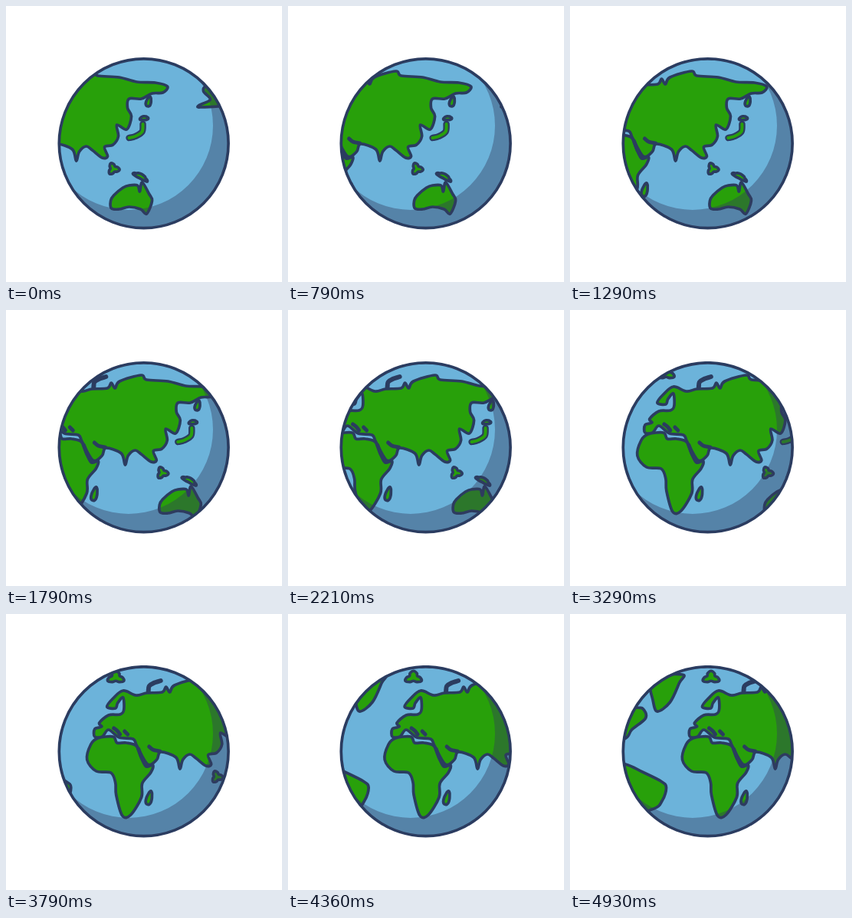
These frames come from a looping animation (360 px wide and 360 px high, 5 s). An HTML page:

```html
<!DOCTYPE html>
<html lang="en">
<head>
<meta charset="utf-8">
<title>Turning globe</title>
<style>
  html, body { margin: 0; height: 100%; overflow: hidden; background: #fff; }
  svg { display: block; width: 100%; height: 100%; }
  .ink { stroke: #2b3c60; stroke-width: 3.7; stroke-linejoin: round; stroke-linecap: round; }
  #map { fill: #28a00a; }
</style>
</head>
<body>
<svg viewBox="0 0 360 360">
  <clipPath id="disc"><circle cx="179.7" cy="179.2" r="110.5"/></clipPath>
  <g clip-path="url(#disc)">
    <rect width="360" height="360" fill="#6cb3da"/>
    <g id="map" class="ink"></g>
    <path fill="#323b5d" fill-opacity=".4" fill-rule="evenodd"
      d="M0 0H360V360H0Z M50 156a110 110 0 0 0 220 0a110 110 0 0 0-220 0Z"/>
  </g>
  <circle class="ink" cx="179.7" cy="179.2" r="110.4" fill="none"/>
</svg>
<script>
const FPS = 14, FRAMES = 70, STEP = 2.55, HOME = 39;
const map = document.getElementById('map');

// Smooth curve through all points.
function curve(pts, closed) {
  const n = pts.length;
  const at = i => pts[closed ? (i + n) % n : Math.max(0, Math.min(n - 1, i))];
  let d = 'M' + pts[0];
  for (let i = 0; i < (closed ? n : n - 1); i++) {
    const [a, b, c, e] = [at(i - 1), at(i), at(i + 1), at(i + 2)];
    const c1 = b.map((v, k) => v + (c[k] - a[k]) / 6);
    const c2 = c.map((v, k) => v - (e[k] - b[k]) / 6);
    d += `C${c1} ${c2} ${c}`;
  }
  return d + (closed ? 'Z' : '');
}

function add(pts, closed, style = '') {
  const path = document.createElementNS('http://www.w3.org/2000/svg', 'path');
  path.setAttribute('d', curve(pts, closed));
  path.setAttribute('style', style);
  map.append(path);
}

const points = text => text.split(',').map(p => p.trim().split(' ').map(Number));
const land = text => add(points(text), true);
const line = (text, width, color = '#2b3c60') =>
  add(points(text), false, `fill:none;stroke:${color};stroke-width:${width}`);

// Tilted ellipse with a three-lobed wobble.
function island(x, y, rx, ry, tilt = 0, wobble = 0.1) {
  const cos = Math.cos(tilt), sin = Math.sin(tilt);
  add(Array.from({ length: 12 }, (_, i) => {
    const a = i * Math.PI / 6, r = 1 + wobble * Math.sin(3 * a);
    const u = rx * r * Math.cos(a), v = ry * r * Math.sin(a);
    return [x + u * cos - v * sin, y + u * sin + v * cos];
  }), true);
}

// Eurasia, clockwise from Scandinavia
land(`96 121, 104 110, 117 100, 134 106, 148 103, 168 102, 173 95, 178 102, 184 93, 212 85,
  219 91, 247 93, 270 99, 294 100, 310 105, 304 113, 290 114, 276 121, 260 121, 258 133,
  263 144, 257 161, 244 155, 246 170, 239 181, 228 184, 232 196, 225 198, 212 188, 204 183,
  195 190, 191 202, 186 187, 166 180, 161 190, 149 196, 135 172, 130 163, 112 161, 98 151,
  90 160, 80 160, 80 150, 89 147, 86 142, 98 132, 113 131, 118 125, 117 109, 110 116, 107 123`);
// Africa
land(`134 172, 141 188, 147 199, 156 197, 153 207, 142 221, 141 239, 127 262, 116 263, 108 236,
  107 220, 101 207, 82 205, 70 190, 75 170, 84 162, 104 160, 109 168, 121 168`);
// Australia
land(`240 247, 252 237, 260 234, 271 234, 274 242, 277 230, 286 245, 290 254, 283 271, 275 265,
  260 262, 247 265, 237 264, 236 254`);
// Alaska
land('390 90, 362 103, 357 111, 366 122, 352 129, 353 132, 390 126');
// Greenland, North and South America
land('28 98, 26 82, 70 79, 66 90, 54 115, 37 127, 31 110');
land('-30 118, 10 122, 19 124, 22 136, 4 151, -4 162, -30 168');
land('-30 194, -4 196, 18 206, 42 218, 49 226, 44 243, 30 255, -30 270');

island(151, 240.5, 3.6, 9, 0.25);         // Madagascar
island(285.5, 125, 3.2, 6.5, 0.25);       // Kamchatka
island(279.5, 146.5, 5.5, 2.5, -0.1);     // Hokkaido
island(239.5, 212.5, 6, 6, -0.4, 0.35);   // Borneo
island(275, 222.5, 10, 3, 0.5, 0.2);      // New Guinea
island(107.5, 83, 9, 6.5, 0, 0.35);       // Iceland

const honshu = '278 154, 277 164, 268 170, 260 172';
line(honshu, 8.5);
line(honshu, 4, '#28a00a');

line('105 149, 109 152, 113 157', 5);     // Adriatic
line('119 153, 123 157', 5);              // Black Sea
line('151 173, 156 177, 165 179', 5);     // Gulf
line('137 176, 142 189, 148 198', 5);     // Red Sea
line('150 101, 151 94, 157 90, 166 87', 6);

function tick() {
  const frame = Math.floor((performance.now() % 5000 + 5) * FPS / 1000) % FRAMES;
  map.setAttribute('transform', `translate(${STEP * (frame - HOME)})`);
  requestAnimationFrame(tick);
}
tick();
</script>
</body>
</html>
```
